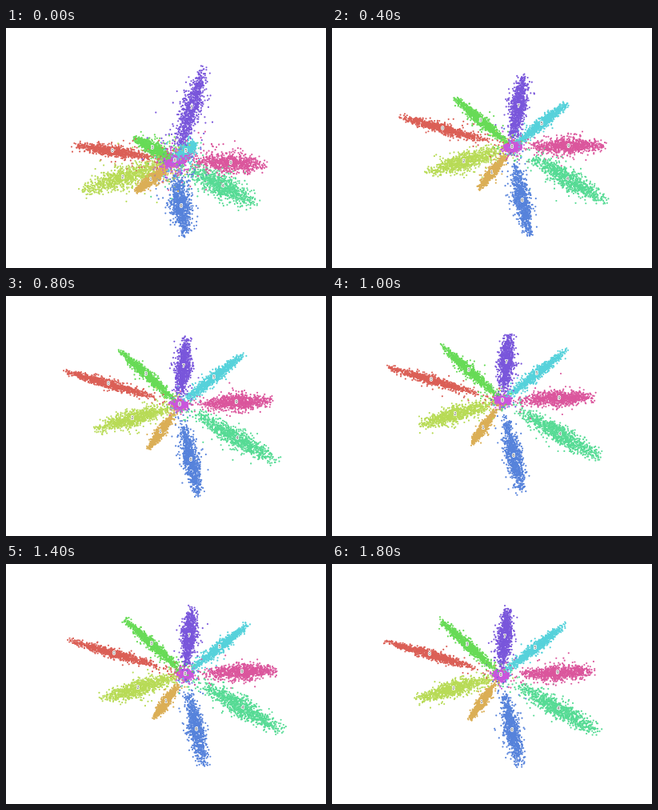
Recreate the animation shown at these times as an HTML page with a canvas. Size 400 by 300 pixels, loop 2000 ms.

```html
<!DOCTYPE html>
<html lang="en">
<head>
<meta charset="utf-8">
<title>Cluster embedding</title>
<style>
  html, body { margin: 0; width: 100%; height: 100%; overflow: hidden; background: #fff; }
  canvas { display: block; width: 400px; height: 300px; }
</style>
</head>
<body>
<canvas id="plot" width="400" height="300"></canvas>
<script>
const ctx = document.getElementById('plot').getContext('2d');
const STEP = 200, PER_CLUSTER = 900;

// Where the middle of the star sits in each step.
const hubs = [
  [211, 166], [228, 157], [225, 149], [222, 142], [217, 136],
  [213, 131], [218, 134], [224, 138], [211, 121], [211, 139]
];

// Offsets of an arm's centre from the hub, crowded at first and then spread out.
// reach: half length relative to that offset; width: spread across the arm in px.
const arms = [
  { first: [-78, -12], star: [-89, -26], reach: .66, width: 2.3 },
  { first: [-30, 24], star: [-24, 34], reach: .66, width: 2.1 },
  { first: [-65, 21], star: [-59, 17], reach: .84, width: 4.4 },
  { first: [-28, -16], star: [-42, -38], reach: .88, width: 2.5 },
  { first: [60, 32], star: [72, 42], reach: .74, width: 5 },
  { first: [14, -12], star: [43, -34], reach: .92, width: 2.5 },
  { first: [8, 57], star: [14, 69], reach: .7, width: 4.2 },
  { first: [21, -66], star: [5, -48], reach: .82, width: 4 },
  { core: true, first: [20, -8], star: [11, 1], reach: 1, width: 2.3 },
  { first: [70, 3], star: [71, -3], reach: .68, width: 4.3 }
];
arms.forEach((arm, i) => arm.color = `hsl(${i * 36 + 4} 65% 60%)`);

const mix = (a, b, k) => a + (b - a) * k;

function random(seed) {
  return () => {
    seed = seed + 0x6D2B79F5 | 0;
    let t = Math.imul(seed ^ seed >>> 15, 1 | seed);
    t = t + Math.imul(t ^ t >>> 7, 61 | t) ^ t;
    return ((t ^ t >>> 14) >>> 0) / 4294967296;
  };
}

function dot(x, y, color) {
  ctx.fillStyle = color;
  ctx.beginPath();
  ctx.arc(x, y, 1.1, 0, 2 * Math.PI);
  ctx.fill();
}

function draw(step) {
  const rnd = random(step * 977 + 11);
  const gauss = () => Math.sqrt(-2 * Math.log(1 - rnd())) * Math.cos(2 * Math.PI * rnd());
  const [hx, hy] = hubs[step];
  const crowd = Math.max(0, 1 - .4 * step);

  const shapes = arms.map(({ core, first, star, reach, width, color }) => {
    const dx = mix(star[0], first[0], crowd), dy = mix(star[1], first[1], crowd);
    const len = Math.hypot(dx, dy);
    return {
      core, color, reach, dx, dy,
      mx: core ? hx : hx + dx, my: core ? hy : hy + dy,
      nx: -dy / len, ny: dx / len,
      width: width * (1 + .25 * crowd)
    };
  });

  ctx.fillStyle = '#fff';
  ctx.fillRect(0, 0, 400, 300);

  for (let n = 0; n < PER_CLUSTER; n++) {
    for (const s of shapes) {
      if (rnd() < .035 + .06 * crowd) {
        // strays scattered between the hub and the arm
        const k = s.core ? 0 : rnd() ** 1.5, r = 4 + s.width * (1 + crowd);
        dot(mix(hx, s.mx, k) + gauss() * r, mix(hy, s.my, k) + gauss() * r, s.color);
        continue;
      }
      const loose = rnd() < .1;
      let t = rnd() + rnd() - 1;
      if (loose && t < 0) t *= 1.4;
      const along = t * s.reach;
      const w = gauss() * s.width * (1.15 - .5 * Math.abs(t)) * (loose ? 1.8 : 1);
      dot(s.mx + s.dx * along + s.nx * w, s.my + s.dy * along + s.ny * w, s.color);
    }
  }

  ctx.font = '5.5px "DejaVu Sans", sans-serif';
  ctx.textAlign = 'center';
  ctx.textBaseline = 'middle';
  ctx.lineJoin = 'round';
  ctx.lineWidth = 1.6;
  ctx.strokeStyle = '#fff';
  ctx.fillStyle = '#666';
  shapes.forEach(({ mx, my }, i) => {
    ctx.strokeText(i, mx, my);
    ctx.fillText(i, mx, my);
  });
}

let shown = -1;
function tick() {
  const step = Math.floor(performance.now() / STEP) % hubs.length;
  if (step !== shown) draw(shown = step);
  requestAnimationFrame(tick);
}
tick();
</script>
</body>
</html>
```
